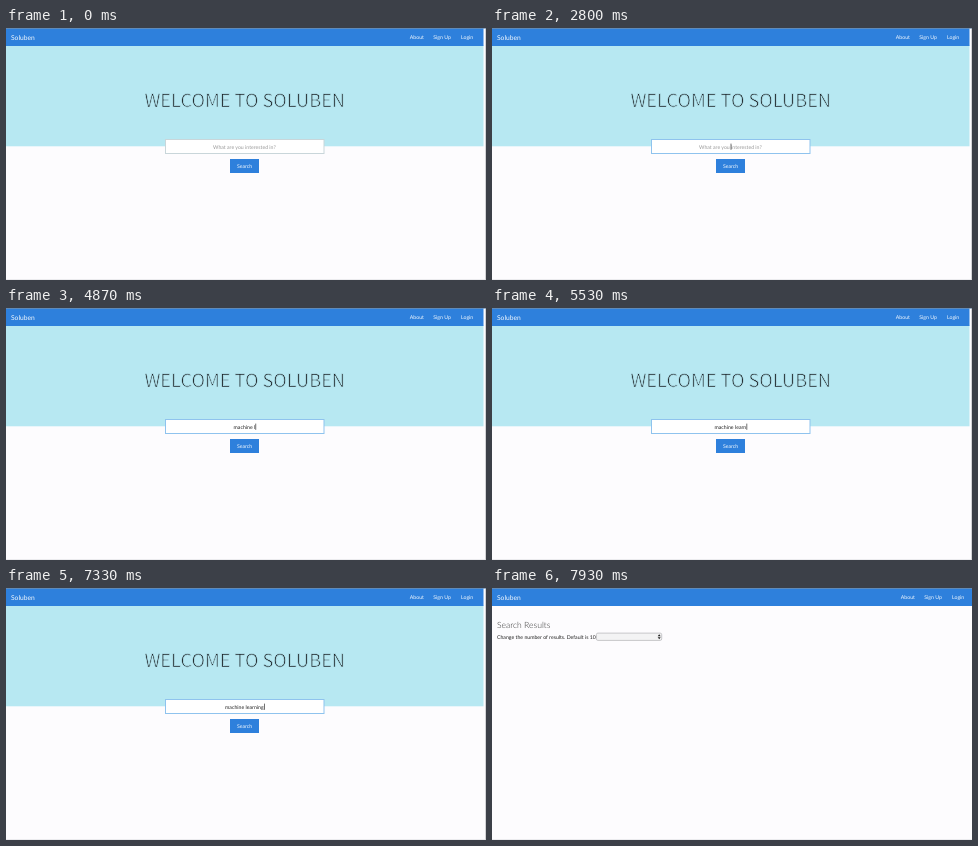
Animation, 480 px wide and 252 px high, one loop 8 s. Source, as an HTML page:

```html
<!DOCTYPE html>
<html lang="en">
<head>
<meta charset="utf-8">
<title>Course search</title>
<style>
  html, body { margin: 0; width: 100%; height: 100%; overflow: hidden; background: #fdfcfe; }
  svg { display: block; width: 100vw; height: 100vh; }
  text { font-family: Lato, "Open Sans", sans-serif; font-size: 5.2px; fill: #222; text-rendering: geometricPrecision; }
  .nav text, .btn { fill: #f4f9ff; font-size: 5.2px; }
  .nav .brand { font-size: 6.7px; }
  /* the sky-coloured outline thins the regular weight to a light one */
  .title { font-family: "Noto Sans CJK JP", "Open Sans", sans-serif; font-weight: 200; font-size: 18.2px;
           fill: #1c2529; stroke: #b7e8f2; stroke-width: .75px; }
  .heading { font-size: 8.6px; font-weight: 300; fill: #333; }
  .mid { text-anchor: middle; }
  .hint { fill: #999; }
</style>
</head>
<body>
<svg viewBox="0 0 480 252" preserveAspectRatio="none">
  <rect width="480" height="252" fill="#fdfcfe"/>
  <g id="home">
    <rect y="17" width="477.5" height="101.3" fill="#b7e8f2"/>
    <g class="nav">
      <rect width="477.5" height="18" fill="#2e80dc"/>
      <text class="brand" x="5" y="11.8">Soluben</text>
      <text x="403.8" y="11.2">About</text>
      <text x="427.3" y="11.2">Sign Up</text>
      <text x="455" y="11.2">Login</text>
    </g>
    <rect x="479" width="1" height="252" fill="#d3d3d6"/>
    <text class="title mid" x="238.7" y="78.8">WELCOME TO SOLUBEN</text>
    <rect id="field" x="159.5" y="111.5" width="158.5" height="14" fill="#fff"/>
    <text id="query" class="mid" x="238.4" y="120.6"></text>
    <rect id="caret" y="115.6" width=".6" height="6.2" fill="#111"/>
    <rect x="224" y="131" width="29" height="14" fill="#2e80dc"/>
    <text class="btn mid" x="238.6" y="140">Search</text>
  </g>
  <g id="results">
    <g class="nav">
      <rect width="480" height="18" fill="#2e80dc"/>
      <text class="brand" x="5" y="11.8">Soluben</text>
      <text x="408.8" y="11.2">About</text>
      <text x="432.3" y="11.2">Sign Up</text>
      <text x="460" y="11.2">Login</text>
    </g>
    <text class="heading" x="5" y="39.7">Search Results</text>
    <text x="5" y="50.6">Change the number of results. Default is 10</text>
    <rect x="104.4" y="45.1" width="65.3" height="7.3" rx="1.5" fill="#f3f3f4" stroke="#b4b4b7" stroke-width=".7"/>
    <path d="M165.7 48.3l1.5-2 1.5 2zM165.7 49.3l1.5 2 1.5-2z" fill="#222"/>
  </g>
  <rect width="480" height=".7" fill="#7590ad"/>
  <rect y="251.5" width="480" height=".5" fill="#d8d8dc"/>
</svg>
<script>
  const LOOP = 8000, FOCUS = 2670, RESULTS = 7400, BLINK = 500;
  const WORDS = "machine learning";
  const KEYS = [3270, 3400, 3530, 3670, 3800, 3930, 4070, 4270,
                4670, 5130, 5270, 5400, 5530, 5670, 5800, 5930];
  const HINT = "What are you interested in?";
  const CENTRE = 238.4;
  const $ = id => document.getElementById(id);
  const show = (id, on) => $(id).setAttribute("visibility", on ? "visible" : "hidden");
  const query = $("query");

  function draw(t) {
    const home = t < RESULTS, focused = t >= FOCUS;
    const typed = KEYS.filter(k => k <= t).length;
    const label = typed ? WORDS.slice(0, typed) : HINT;
    if (query.textContent !== label) query.textContent = label;
    query.classList.toggle("hint", !typed);

    const width = typed ? query.getComputedTextLength() : 0;
    $("caret").setAttribute("x", CENTRE + width / 2 + 0.3);
    $("field").setAttribute("stroke", focused ? "#8fc3ee" : "#c9d6da");

    const since = t - (typed ? KEYS[typed - 1] : FOCUS);
    $("home").style.display = home ? "" : "none";
    show("results", !home);
    show("caret", home && focused && Math.floor(since / BLINK) % 2 === 0);
  }

  const start = performance.now();
  function tick() {
    draw((performance.now() - start) % LOOP);
    requestAnimationFrame(tick);
  }
  tick();
</script>
</body>
</html>
```
